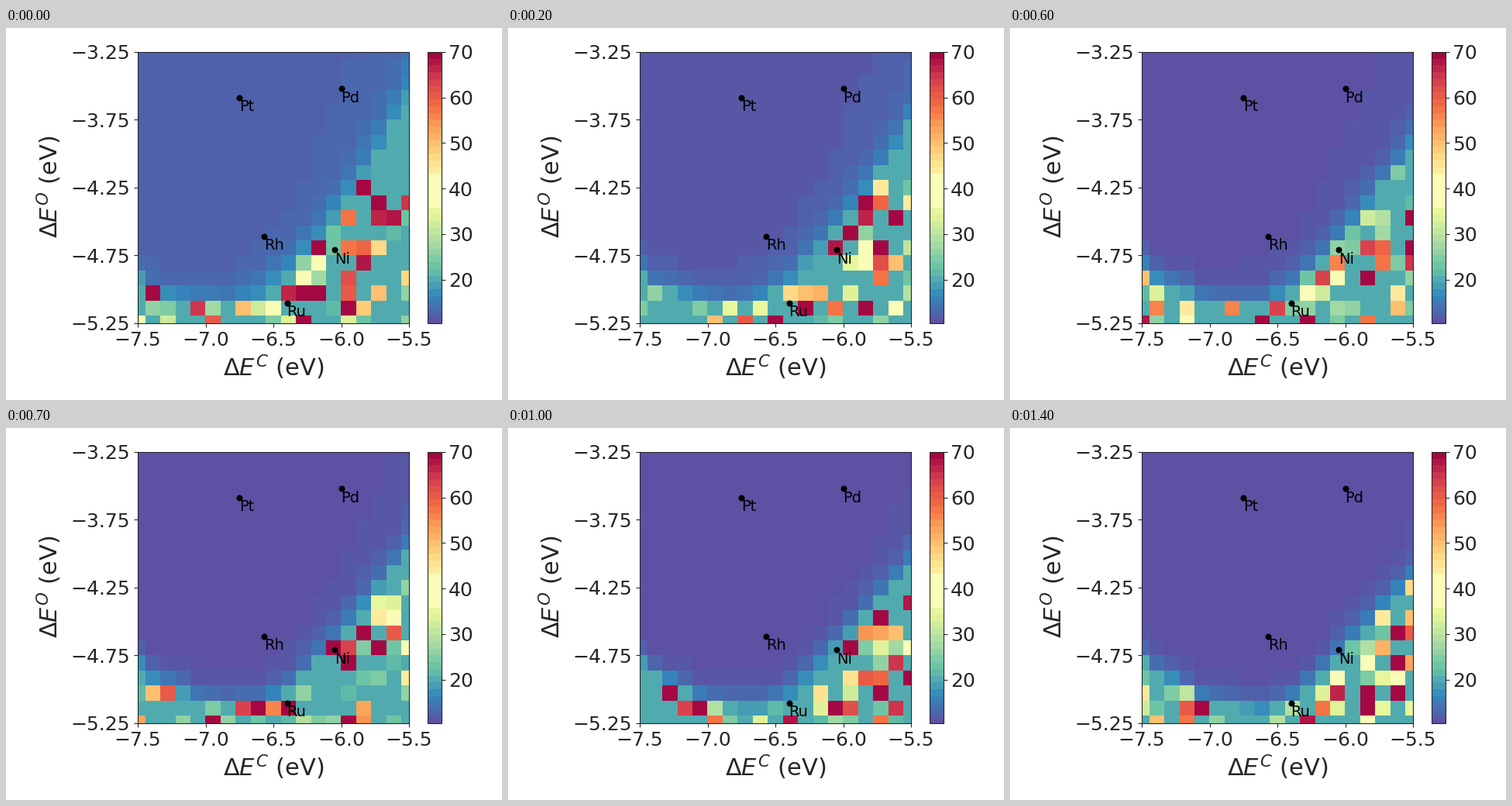
A matplotlib script for the animation above (1500 ms loop, 640 px wide and 480 px high).

```python
import numpy as np
import matplotlib.pyplot as plt
from matplotlib.animation import FuncAnimation
from matplotlib.colors import ListedColormap

W, H, DPI = 640, 480, 100
FRAMES, INTERVAL = 15, 100
N = 19                        # grid points per axis
VMIN, VMAX = 10.4, 70
PLATEAU = 20                  # typical value below the front
INK = "#262626"

plt.rcParams.update({
    "font.family": "DejaVu Sans", "font.size": 18,
    "text.color": INK, "axes.edgecolor": INK, "axes.linewidth": 0.8,
    "xtick.color": INK, "ytick.color": INK,
})

# Row at which the plateau begins, per column, at the start and the end
KNOTS = [0, 1, 2, 4, 6, 8, 10, 12, 14, 16, 18]
FRONT_START = [15.2, 16, 16.4, 16.8, 17, 16.4, 14.8, 12.6, 10, 7.2, 3.7]
FRONT_END = [13.8, 14.8, 15.2, 16.5, 17, 17.3, 16.6, 14.7, 12.7, 10.5, 8.7]

METALS = {
    "Pt": (-6.75, -3.585), "Pd": (-6.0, -3.52), "Rh": (-6.57, -4.61),
    "Ni": (-6.05, -4.71), "Ru": (-6.4, -5.10),
}


def banded_cmap(count=80):
    """Spectral in flat bands: fine at the low end, one wide pale band."""
    k = np.arange(count)
    t = (np.where(k < 8, k, k // 2 * 2 + 0.5) + 0.5) / count
    t[(t > 0.417) & (t < 0.546)] = 0.48
    return ListedColormap(plt.get_cmap("Spectral_r")(t))


def field(n):
    """Smooth map above a moving front, scattered noise below it."""
    rng = np.random.default_rng(40 + n)
    row, col = np.mgrid[:N, :N]
    step = (n / (FRAMES - 1)) ** 0.6
    knots = (1 - step) * np.array(FRONT_START) + step * np.array(FRONT_END)
    depth = np.interp(col, KNOTS, knots) - row
    above = np.clip(depth, 0, None)

    # The transition is wider towards the right and sharpens with time
    right = col / (N - 1)
    floor = 10.55 + 1.65 * np.exp(-n / 3.2)
    decay = 0.22 + 0.28 * right * (1 - 0.7 * step)
    smooth = floor + (PLATEAU - floor) * decay ** above
    smooth += (2 - 1.3 * step) * right ** 2 * np.exp(-above / 9)

    kind = rng.random((N, N))
    hot = np.clip((row - 7.5) / 8, 0.03, 0.38)
    mild = rng.uniform(20, 27, (N, N))
    wild = np.minimum(rng.uniform(28, 82, (N, N)), VMAX)
    noisy = np.where(kind < hot, wild,
                     np.where(kind < 1.45 * hot, mild, PLATEAU))
    return np.where(depth > 0, smooth, noisy)


def pixel_axes(x, y, w, h):
    return fig.add_axes([x / W, y / H, w / W, h / H])


fig = plt.figure(figsize=(W / DPI, H / DPI), dpi=DPI, facecolor="white")
ax = pixel_axes(170, 99.1, 350, 350)
half = 1 / (N - 1)
image = ax.imshow(
    field(0), cmap=banded_cmap(), vmin=VMIN, vmax=VMAX, aspect="auto",
    interpolation="nearest",
    extent=(-7.5 - half, -5.5 + half, -5.25 - half, -3.25 + half))
ax.set(xlim=(-7.5, -5.5), ylim=(-5.25, -3.25),
       xticks=np.arange(-7.5, -5.4, 0.5), yticks=np.arange(-5.25, -3.2, 0.5))

for name, (x, y) in METALS.items():
    ax.plot(x, y, "o", color="black", ms=4.8)
    ax.annotate(name, (x, y), xytext=(0, -12.5), textcoords="offset points",
                fontsize=14, color="black")

fig.text(345 / W, 30.5 / H, r"$\Delta E^C$ (eV)", fontsize=22,
         ha="center", va="baseline")
fig.text(67 / W, 275 / H, r"$\Delta E^O$ (eV)", fontsize=22, rotation=90,
         rotation_mode="anchor", ha="center", va="baseline")

bar = fig.colorbar(image, cax=pixel_axes(544, 99.1, 17.5, 350),
                   ticks=range(20, 71, 10))
bar.outline.set_edgecolor(INK)


def update(n):
    image.set_data(field(n))
    return [image]


anim = FuncAnimation(fig, update, frames=FRAMES, interval=INTERVAL,
                     repeat=True, repeat_delay=0)
plt.show()
```
